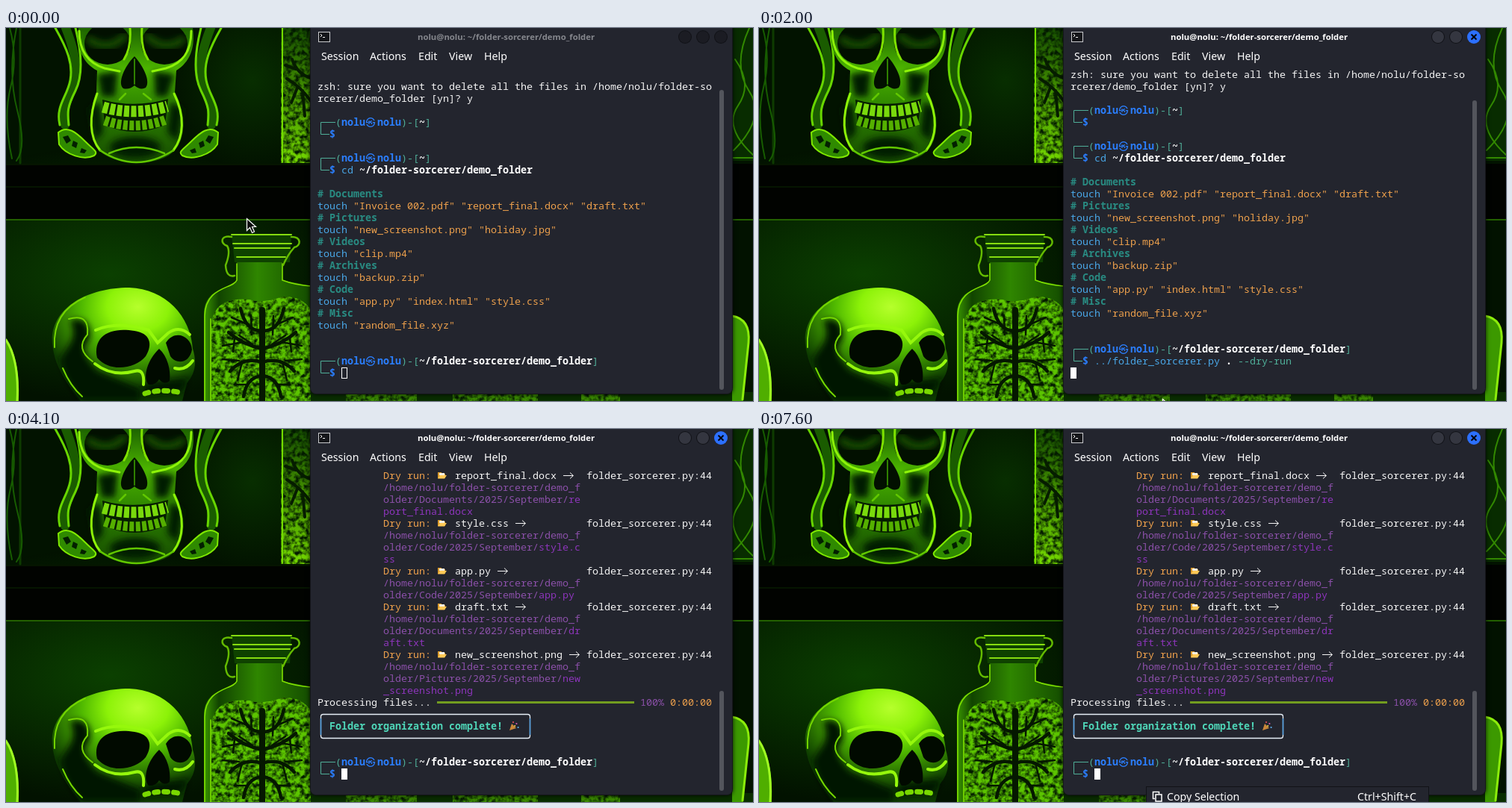
Write an HTML page with a canvas that moves like this. It is 1000 by 500 pixels and loops after 8 s.

```html
<!DOCTYPE html>
<html lang="en">
<head>
<meta charset="utf-8">
<title>Terminal on a green desktop</title>
<style>
  html, body { margin: 0; width: 100%; height: 100%; overflow: hidden; background: #010700; }
  svg, canvas { position: absolute; left: 0; top: 0; width: 1000px; height: 500px; }
</style>
</head>
<body>
<svg viewBox="0 0 1000 500" fill="none" stroke-linecap="round">
  <defs>
    <radialGradient id="wall"><stop stop-color="#0b4000"/><stop offset="1" stop-color="#021200"/></radialGradient>
    <linearGradient id="face" x2="0" y2="1">
      <stop stop-color="#1d6400"/><stop offset=".3" stop-color="#4cb400"/><stop offset=".6" stop-color="#2c8200"/><stop offset="1" stop-color="#154a00"/>
    </linearGradient>
    <radialGradient id="bone" cx=".6" cy=".17" r=".72">
      <stop stop-color="#b6ff2c"/><stop offset=".3" stop-color="#8cf208"/><stop offset=".55" stop-color="#4fb800"/><stop offset="1" stop-color="#0c3a00"/>
    </radialGradient>
    <linearGradient id="glass">
      <stop stop-color="#3a9600"/><stop offset=".14" stop-color="#114400"/><stop offset=".5" stop-color="#2f8600"/><stop offset="1" stop-color="#144c00"/>
    </linearGradient>
    <linearGradient id="glow" x2="0" y2="1"><stop stop-color="#174f00"/><stop offset="1" stop-color="#74d800"/></linearGradient>
    <filter id="soft" x="-40%" y="-40%" width="180%" height="180%"><feGaussianBlur stdDeviation="4"/></filter>
    <filter id="grain" color-interpolation-filters="sRGB">
      <feTurbulence type="fractalNoise" baseFrequency=".16" numOctaves="3"/>
      <feColorMatrix values="0 0 0 0 .01  0 0 0 0 .1  0 0 0 0 0  2.6 0 0 0 -.95"/>
      <feComposite in2="SourceAlpha" operator="in" result="specks"/>
      <feMerge><feMergeNode in="SourceGraphic"/><feMergeNode in="specks"/></feMerge>
    </filter>
  </defs>

  <!-- back wall and shelf -->
  <rect width="1000" height="182" fill="#021300"/>
  <ellipse cx="330" cy="70" rx="110" ry="120" fill="url(#wall)" opacity=".6"/>
  <rect y="257" width="1000" height="243" fill="#021200"/>
  <ellipse cx="140" cy="330" rx="320" ry="170" fill="url(#wall)"/>
  <rect y="182" width="1000" height="74" fill="#010300"/>
  <path d="M0 213H408M0 183H408" stroke="#0a2600"/>
  <path d="M0 257H408M972 257H1000" stroke="#236000" stroke-width="2"/>
  <path d="M19 0V181" stroke="#0e3b00" stroke-width="3"/>
  <path d="M5 0Q16 40 6 80T8 175M14 0Q2 60 15 110T14 178" stroke="#175c00" stroke-width="2"/>

  <!-- upper skull -->
  <g id="strand">
    <path d="M80 0C92 30 98 58 90 78S76 106 79 130" stroke="#1a5c00" stroke-width="12"/>
    <path d="M66 0C82 28 90 48 86 70S66 104 72 130M93 0C100 28 104 62 93 84S82 112 84 130" stroke="#68d600" stroke-width="3"/>
    <path d="M70 140C82 130 94 140 106 152S124 166 118 171C104 178 80 170 71 156Z" fill="#2f8a00" stroke="#7fe900" stroke-width="2"/>
    <path d="M76 146l7-2 4 7-6 4zM90 151l6 3-2 7-6-3zM101 161l7 3-3 4-6-1z" fill="#032000"/>
  </g>
  <use href="#strand" transform="matrix(-1 0 0 1 354 0)"/>
  <path d="M97 0C94 28 104 48 122 57L121 86C111 110 110 146 124 164Q142 180 175 181Q212 180 227 163C242 145 240 112 226 86L228 57C246 46 254 26 250 0Z" fill="url(#face)"/>
  <g fill="#061f00" filter="url(#soft)">
    <ellipse cx="173" cy="160" rx="34" ry="14"/>
    <path d="M122 62L150 58L146 92L128 92ZM226 62L198 58L200 92L216 92ZM110 108L126 98L130 140L118 152ZM238 108L220 98L216 140L230 152Z"/>
  </g>
  <path d="M98 4C98 30 110 47 132 54L152 58M248 4C248 30 238 47 214 54L196 58M122 88C111 118 111 146 126 164M225 88C240 118 238 146 224 164" stroke="#8ef408" stroke-width="3"/>
  <path d="M126 164Q174 196 224 164M138 168Q174 152 212 168M160 88L152 96M184 88L194 96" stroke="#62c800" stroke-width="2.5"/>
  <ellipse cx="136" cy="21" rx="31" ry="28" fill="#021000"/>
  <ellipse cx="212" cy="21" rx="31" ry="28" fill="#021000"/>
  <path d="M112 16Q136 32 158 12M190 12Q212 32 236 16" stroke="#174c00" stroke-width="10" filter="url(#soft)"/>
  <path d="M166 0Q168 26 158 42M182 0Q180 26 190 42" stroke="#7fe200" stroke-width="3"/>
  <path d="M172 38C158 52 149 74 157 81Q165 83 172 77Q180 84 187 80C194 72 184 51 172 38Z" fill="#021000"/>
  <path d="M172 42V75" stroke="#2f8000" stroke-width="2"/>
  <path d="M129 96Q172 108 217 95L213 130Q172 148 132 130Z" fill="#061f00"/>
  <g stroke-linecap="butt" stroke="#79da0c" stroke-dasharray="7 2.5">
    <path d="M130 106Q172 118 216 105" stroke-width="15"/>
    <path d="M132 124Q172 138 214 123" stroke-width="13" stroke="#55b000" stroke-dasharray="6 2.5"/>
  </g>

  <!-- upper jar -->
  <path d="M368 0H408V181H368Z" fill="url(#glow)" filter="url(#grain)"/>
  <path d="M370 0V180" stroke="#74dc00" stroke-width="2"/>
  <path d="M376 68Q394 78 408 98M383 42Q390 62 408 67M390 80L382 100M397 84L400 118M388 55L374 50" stroke="#061d00" stroke-width="4"/>

  <!-- lower skull -->
  <path d="M62 424C58 376 108 348 165 348C214 350 247 386 250 430C257 452 251 466 242 476L236 500H100C86 480 66 460 62 424Z" fill="url(#bone)"/>
  <g fill="#031800" filter="url(#soft)">
    <path d="M86 392C104 386 117 398 111 419C98 431 108 444 122 460L180 484V500H100C88 482 76 466 73 444C82 425 96 420 86 392Z"/>
    <path d="M186 476L244 470L236 488L186 492Z"/>
  </g>
  <path d="M84 390Q112 382 109 411Q92 430 116 447M65 428Q62 380 106 361M76 456Q86 480 102 494" stroke="#74d600" stroke-width="2"/>
  <path d="M122 442C116 414 138 400 172 406C193 409 197 424 187 440C174 456 140 463 122 442ZM214 422C226 403 248 413 249 431C246 449 229 452 220 440ZM205 430C190 444 182 468 191 478Q200 479 205 471Q212 479 219 473C221 458 216 440 205 430Z" fill="#010a00"/>
  <path d="M119 450Q142 468 172 460Q186 456 184 478M120 405Q150 392 191 405L203 422L217 409Q232 398 246 411M226 456Q240 460 250 446" stroke="#96f80c" stroke-width="4"/>
  <path d="M186 490Q208 483 235 489" stroke="#79d800" stroke-width="7" stroke-dasharray="5 8"/>

  <!-- lower jar -->
  <path d="M309 312H370V338C385 342 400 342 408 348V500H265V384C266 344 306 350 309 338Z" fill="url(#glass)"/>
  <path d="M275 396Q279 360 326 364Q343 370 370 360Q397 359 408 378V500H275Z" fill="#5cc400" filter="url(#grain)"/>
  <path d="M309 316V338C304 350 267 346 266 386V500M370 316V338Q385 344 408 346M274 390V500" stroke="#7fe000" stroke-width="1.6"/>
  <path d="M302 278H382L380 314H306Z" fill="#0f4200"/>
  <path d="M302 277H382M304 289H382M306 295H380M309 307H374" stroke="#86dc10" stroke-width="2"/>
  <path d="M302 280C286 277 287 290 296 292Q301 300 294 318Q295 335 306 332M382 280C396 280 395 292 386 294Q377 304 371 318" stroke="#64bb00" stroke-width="2.5"/>
  <path d="M343 378V500" stroke="#051800" stroke-width="8"/>
  <g id="roots" stroke="#051800" stroke-width="4.5">
    <path d="M343 406Q321 407 314 376M343 430Q316 424 298 408M343 448Q318 440 300 460M343 466Q322 468 318 494"/>
    <path d="M325 398L302 388M317 421L290 426M329 411L328 386M312 446L290 444M330 424L312 412M324 478L306 478M316 448L310 472M306 416L304 434" stroke-width="2.5"/>
  </g>
  <use href="#roots" transform="matrix(-1 0 0 1 686 0)"/>

  <!-- edges -->
  <path d="M0 416Q19 442 17 500H0Z" fill="#4fae00"/>
  <path d="M0 418Q18 446 15 500" stroke="#a0ff22" stroke-width="3"/>
  <path d="M408 488H1000V500H408Z" fill="#092d00"/>
  <path d="M455 490H550V500H455ZM598 490H712V500H598ZM770 490H822V500H770Z" fill="#3b8b00" filter="url(#grain)"/>
  <path d="M972 0H1000V178H972Z" fill="#082c00"/>
  <path d="M976 42Q1000 75 980 104T1000 170M995 0Q972 50 995 85T974 164M972 174H1000" stroke="#328800" stroke-width="2"/>
  <path d="M972 386Q996 389 995 420L986 500H972Z" fill="#3c9900"/>
  <path d="M972 386Q997 390 994 422L986 498" stroke="#8bec0b" stroke-width="3"/>
</svg>
<canvas id="stage" width="1000" height="500"></canvas>

<script>
const LOOP = 8000, STEP = 100;
const LEFT = 417, CELL = 8, ROW = 16, BASE = 67;
const BG = '#23252e', MENU_FONT = '500 14.2px "Noto Sans", sans-serif';
const ctx = document.getElementById('stage').getContext('2d');

// Upper-case keys are bold
const INK = {
  w: '#f4f4f4', W: '#ffffff', g: '#4fae98', B: '#2b7fff', c: '#49a6e6',
  T: '#298b82', o: '#eda04c', p: '#8b50a9', f: '#8c35ba', G: '#4fd6b8',
};

// Shell content: "|x" switches to ink x
const user = 'nolu';
const prompt = dir => `|g┌(|B${user}㉿${user}|g)-[|W${dir}|g]`;
const shell = (cmd = '') => '|g└|B$ ' + cmd;
const here = prompt('~/folder-sorcerer/demo_folder');
const touch = (title, ...names) =>
  ['|T# ' + title, '|ctouch |o' + names.map(n => `"${n}"`).join(' ')];

const session = [
  '', `|wzsh: sure you want to delete all the files in /home/${user}/folder-so`,
  '|wrcerer/demo_folder [yn]? y', '',
  prompt('~'), shell(), '',
  prompt('~'), shell('|ccd |W~/folder-sorcerer/demo_folder'), '',
  ...touch('Documents', 'Invoice 002.pdf', 'report_final.docx', 'draft.txt'),
  ...touch('Pictures', 'new_screenshot.png', 'holiday.jpg'),
  ...touch('Videos', 'clip.mp4'),
  ...touch('Archives', 'backup.zip'),
  ...touch('Code', 'app.py', 'index.html', 'style.css'),
  ...touch('Misc', 'random_file.xyz'),
  '', '', here, shell(),
];
const running = [...session.slice(0, -1), shell('|c../folder_sorcerer.py |W. |g--dry-run'), '', ''];

function dryRun(folder, name) {
  const path = `/home/${user}/folder-sorcerer/demo_folder/${folder}/2025/September/`;
  const full = path + name, pad = ' '.repeat(11), rows = [];
  for (let i = 0; i < full.length; i += 33) {
    const cut = Math.max(i, path.length);
    rows.push(`${pad}|p${full.slice(i, Math.min(i + 33, cut))}|f${full.slice(cut, i + 33)}`);
  }
  const gap = ' '.repeat(19 - name.length);
  return [`${pad}|oDry run: 📂 |w${name} →${gap}folder_sorcerer.py:44`, ...rows];
}
const finished = [
  ...dryRun('Documents', 'report_final.docx'),
  ...dryRun('Code', 'style.css'),
  ...dryRun('Code', 'app.py'),
  ...dryRun('Documents', 'draft.txt'),
  ...dryRun('Pictures', 'new_screenshot.png'),
  '|wProcessing files... ━ |p100% |o0:00:00',
  '╭', '|G  Folder organization complete! 🎉', '', '',
  here, shell(),
];

function line(points, color, width = 1) {
  ctx.beginPath();
  points.forEach(([x, y]) => ctx.lineTo(x, y));
  ctx.strokeStyle = color;
  ctx.lineWidth = width;
  ctx.stroke();
}
function rect(x, y, w, h, color) {
  ctx.fillStyle = color;
  ctx.fillRect(x, y, w, h);
}
function disc(x, y, r, color) {
  ctx.fillStyle = color;
  ctx.beginPath();
  ctx.arc(x, y, r, 0, 7);
  ctx.fill();
}
function label(text, x, y, font, color = '#fff', align = 'left') {
  ctx.font = font;
  ctx.fillStyle = color;
  ctx.textAlign = align;
  ctx.fillText(text, x, y);
}

// Wide glyphs: [cells, draw(x, row centre, colour)]
const GLYPHS = {
  '┌': [3, (x, y, c) => line([[x + 24, y + .5], [x + 4.5, y + .5], [x + 4.5, y + 8]], c)],
  '└': [2, (x, y, c) => line([[x + 4.5, y - 8], [x + 4.5, y + .5], [x + 16, y + .5]], c)],
  '→': [2, (x, y, c) => {
    line([[x + 1, y + .5], [x + 14, y + .5]], c);
    line([[x + 10, y - 3.5], [x + 14.5, y + .5], [x + 10, y + 4.5]], c);
  }],
  '㉿': [2, (x, y, c) =>
    label('㉿', x + 7, y + 5, '700 13px "Noto Sans CJK KR", "Noto Sans CJK JP", sans-serif', c, 'center')],
  '━': [33, (x, y) => rect(x, y - 1, 264, 3, '#729c1f')],
  '╭': [0, (x, y) => {
    ctx.beginPath();
    ctx.roundRect(x + 4.5, y + .5, 280, 32, 3);
    ctx.strokeStyle = '#e6eef6';
    ctx.lineWidth = 1.3;
    ctx.stroke();
    for (const side of [x + 4.5, x + 284.5]) line([[side, y + 6], [side, y + 28]], '#4f9ee0', 1.5);
  }],
  '📂': [2, (x, y) => {
    rect(x + 1, y - 4, 5, 3, '#d99a2b');
    rect(x + 1, y - 2, 10, 6, '#d99a2b');
    rect(x + 3, y - 3, 7, 3, '#f3efe2');
    ctx.fillStyle = '#ffc955';
    ctx.fill(new Path2D(`M${x + 4} ${y}h9l-3 4.5h-9z`));
  }],
  '🎉': [2, (x, y) => {
    ctx.fillStyle = '#c9873a';
    ctx.fill(new Path2D(`M${x + 1} ${y + 6}l3-9 6 6z`));
    ['#e94f5e', '#f2d04b', '#d65bc0', '#5fb3f0'].forEach((c, i) =>
      disc(x + 6 + i * 2.2, y - 5 + (i * 5) % 8, 1.1, c));
  }],
};

function drawRow(text, row) {
  let x = LEFT, ink = 'w';
  const y = BASE + row * ROW, chars = [...text];
  for (let i = 0; i < chars.length; i++) {
    const ch = chars[i];
    if (ch === '|') { ink = chars[++i]; continue; }
    if (GLYPHS[ch]) {
      GLYPHS[ch][1](x, y - 5, INK[ink]);
      x += GLYPHS[ch][0] * CELL;
    } else {
      const weight = ink < 'a' ? 700 : 400;
      label(ch, x, y, `${weight} 13.333px "Noto Sans Mono", monospace`, INK[ink]);
      x += CELL;
    }
  }
}

function drawWindow(active) {
  ctx.save();
  ctx.shadowColor = '#000';
  ctx.shadowBlur = 6;
  ctx.fillStyle = BG;
  ctx.beginPath();
  ctx.roundRect(407.5, -20, 565, 510.5, 7);
  ctx.fill();
  ctx.restore();
  ctx.strokeStyle = '#15161b';
  ctx.lineWidth = 1;
  ctx.stroke();

  ctx.strokeStyle = '#c9cacd';
  ctx.strokeRect(418.5, 5.5, 15, 13);
  rect(419, 6, 14, 12, '#15161a');
  line([[421, 8], [423, 10], [421, 12]], '#fff');
  line([[424, 12.5], [427, 12.5]], '#fff');
  label(`${user}@${user}: ~/folder-sorcerer/demo_folder`, 669.5, 16,
    '600 11.3px "Noto Sans", sans-serif', active ? '#fff' : '#85878d', 'center');
  for (const x of [909, 933, 957]) {
    const close = active && x === 957;
    disc(x, 12, 9, close ? '#2c70ff' : '#111217');
    if (!close) disc(x, 12, 8, active ? '#343640' : '#1b1c23');
  }
  if (active) {
    line([[953.5, 8.5], [960.5, 15.5]], '#05070c', 2);
    line([[960.5, 8.5], [953.5, 15.5]], '#05070c', 2);
  }
  [['Session', 422], ['Actions', 487], ['Edit', 552], ['View', 593], ['Help', 640]]
    .forEach(([text, x]) => label(text, x, 43, MENU_FONT));
}

function drawTerminal(t) {
  const [rows, thumb, col] =
    t < 2000 ? [session, 83, 4] :
    t < 2800 ? [running.slice(0, -1), 97, 0] :
    t < 3500 ? [running, 110, 0] : [finished, 351, 4];
  rows.slice(-26).forEach(drawRow);
  ctx.fillStyle = '#53555c';
  ctx.beginPath();
  ctx.roundRect(955, thumb, 6, 485 - thumb, 3);
  ctx.fill();
  return LEFT + col * CELL;
}

function drawMenu(x, y) {
  rect(x, y, 379, 60, '#111217');
  rect(x + 1, y + 1, 377, 59, BG);
  [['Copy Selection', 'Ctrl+Shift+C'], ['Paste Clipboard', 'Ctrl+Shift+V']].forEach(([name, keys], i) => {
    const base = y + 19 + i * 24;
    label(name, x + 28, base, MENU_FONT);
    label(keys, x + 362, base, MENU_FONT, '#fff', 'right');
    ctx.strokeStyle = '#fff';
    ctx.lineWidth = 1.5;
    ctx.strokeRect(x + 9.5, base - 11.5, 8, 9);
    rect(x + 12, base - 9, 10, 11, BG);
    ctx.strokeRect(x + 13, base - 8, 8, 9);
  });
  rect(x + 65, y + 21, 8, 1, '#fff');
}

// Pointer path: time, x, y
const PATH = [
  [0, 322, 255], [500, 538, 474], [700, 538, 474], [1000, 514, 463], [1200, 514, 463],
  [1500, 530, 502], [1900, 540, 502], [2000, 540, 497], [2800, 384, 470],
  [3300, 251, 445], [3500, 233, 436], [3700, 241, 430], [4000, 25, 490], [4100, 5, 505],
  [5300, 190, 505], [5400, 209, 485], [5600, 430, 472], [5700, 538, 489], [6000, 538, 489],
  [6100, 518, 481], [6200, 516, 480], [6500, 516, 480], [6600, 515, 470], [6700, 530, 505], [LOOP, 530, 505],
];
function pointerAt(t) {
  const i = PATH.findIndex(p => p[0] > t);
  const [t0, x0, y0] = PATH[i - 1], [t1, x1, y1] = PATH[i];
  const k = (t - t0) / (t1 - t0);
  return [Math.round(x0 + (x1 - x0) * k), Math.round(y0 + (y1 - y0) * k)];
}
function drawPointer(x, y, beam) {
  if (beam) {
    for (const [color, width] of [['#000', 3], ['#fff', 1.3]]) {
      line([[x + .5, y - 7], [x + .5, y + 7]], color, width);
      for (const end of [-8, 8]) line([[x - 3, y + end], [x + 4, y + end]], color, width);
    }
    return;
  }
  const arrow = new Path2D(`M${x + .5} ${y + .5}v16l4 -4 3 7 3 -1.5 -3 -6.5h5z`);
  ctx.fillStyle = '#0b0b0b';
  ctx.strokeStyle = '#fff';
  ctx.lineWidth = 1.2;
  ctx.fill(arrow);
  ctx.stroke(arrow);
}

function draw(now) {
  const t = Math.floor(now % LOOP / STEP) * STEP;
  const within = (a, b) => t >= a && t < b;
  const active = within(700, 5100) || t >= 6600;
  const menu = within(1000, 1600) ? [513, 462] : within(6600, 7300) ? [515, 469] : t >= 7600 ? [518, 479] : null;

  ctx.clearRect(0, 0, 1000, 500);
  drawWindow(active);
  const caret = drawTerminal(t);
  if (active) rect(caret, 455, 8, 15, '#fff');
  else {
    ctx.strokeStyle = '#fff';
    ctx.lineWidth = 1;
    ctx.strokeRect(caret + .5, 455.5, 7, 14);
  }
  if (menu) drawMenu(...menu);
  const [x, y] = pointerAt(t);
  drawPointer(x, y, !menu && x > 408 && y > 52 && y < 490);
}

const start = performance.now();
function frame() {
  draw(performance.now() - start);
  requestAnimationFrame(frame);
}
frame();
</script>
</body>
</html>
```
